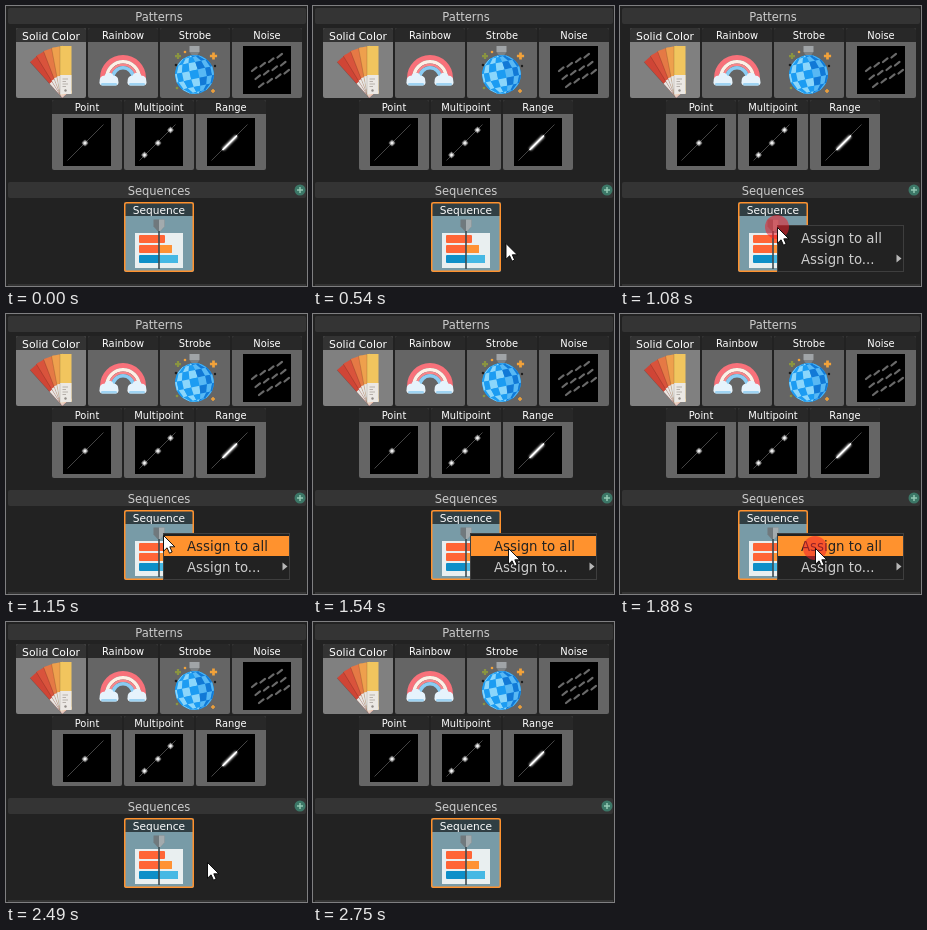
These frames come from a looping animation (301x280 px, 3750 ms). An HTML page:

```html
<!DOCTYPE html>
<html lang="en">
<head>
<meta charset="utf-8">
<title>Pattern and sequence panel</title>
<style>
  html, body { margin: 0; width: 100%; height: 100%; overflow: hidden; background: #222; }
  svg { display: block; width: 301px; height: 280px; }
  text { font-family: "DejaVu Sans", Verdana, sans-serif; fill: #fff; }
  .mid { text-anchor: middle; }
  .head { font-size: 11.5px; fill: #ccc; }
  .item { font-size: 13.3px; fill: #ccc; }
</style>
</head>
<body>
<svg id="stage" viewBox="0 0 301 280">
  <defs>
    <radialGradient id="glow">
      <stop offset="0" stop-color="#fff"/>
      <stop offset=".35" stop-color="#fff" stop-opacity=".8"/>
      <stop offset="1" stop-color="#fff" stop-opacity="0"/>
    </radialGradient>
    <filter id="soft" x="-50%" y="-50%" width="200%" height="200%"><feGaussianBlur stdDeviation="1"/></filter>
  </defs>
  <rect width="301" height="280" fill="#222"/>
  <g id="panel"></g>

  <g transform="translate(118 196)">
    <rect id="tile" width="70" height="70" rx="2" fill="#789ba7"/>
    <path id="tileHead" d="M0 14V2Q0 0 2 0H68Q70 0 70 2V14Z" fill="#303e43"/>
    <text class="mid" x="35" y="12" font-size="10.6">Sequence</text>
    <rect x="11" y="31" width="48" height="35" fill="#e9eff0"/>
    <rect x="15" y="33" width="26" height="8" rx="1" fill="#ff6536"/>
    <rect x="15" y="43" width="33" height="8" rx="1" fill="#ff6536"/>
    <rect x="35" y="43" width="13" height="8" rx="1" fill="#ff9234"/>
    <rect x="15" y="53" width="39" height="8" rx="1" fill="#0e8fc8"/>
    <rect x="35" y="53" width="19" height="8" rx="1" fill="#46b8e4"/>
    <path d="M35 28V67" stroke="#3c4a50" stroke-width="1.6"/>
    <path d="M29.5 17.5H40.5V24.5L36.5 29H33.5L29.5 24.5Z" fill="#70797d"/>
    <path d="M35 17.5H40.5V24.5L36.5 29H35Z" fill="#a3abae"/>
    <rect x=".75" y=".75" width="68.5" height="68.5" rx="2" fill="none" stroke="#ff922e" stroke-width="1.5"/>
  </g>

  <g id="menu" visibility="hidden">
    <rect x="157.5" y="219.5" width="126" height="46" fill="#222" stroke="#3e3e3e"/>
    <rect id="pick" x="158" y="222" width="125" height="20" fill="#ff922e"/>
    <text id="pickText" class="item" x="181" y="237">Assign to all</text>
    <text class="item" x="181" y="258">Assign to...</text>
    <path d="M276.5 248.5L281.5 252.5L276.5 256.5Z" fill="#b8b8b8"/>
  </g>
  <circle id="press" r="12" fill="#f0202c" fill-opacity=".55" visibility="hidden"/>
  <path id="cursor" d="M.5 .5V16.2L4.1 12.8L6.5 18.2L9.1 17L6.8 11.8H11.8Z"
        fill="#fff" stroke="#000" stroke-width=".9" visibility="hidden"/>
</svg>
<script>
const $ = id => document.getElementById(id);
const range = n => [...Array(n).keys()];
const rect = (x, y, w, h, fill, more = "") =>
  `<rect x="${x}" y="${y}" width="${w}" height="${h}" fill="${fill}" ${more}/>`;
const line = (d, stroke, width = 1, more = "") =>
  `<path d="${d}" fill="none" stroke="${stroke}" stroke-width="${width}" ${more}/>`;
const dot = (x, y, r, fill) => `<circle cx="${x}" cy="${y}" r="${r}" fill="${fill}"/>`;

function header(y, label) {
  return rect(2, y, 298, 16, "#343434", 'rx="2"') +
    `<text class="head mid" x="153" y="${y + 13}">${label}</text>`;
}

function tile(x, y, label, art, lit = false) {
  return `<g transform="translate(${x} ${y})">` +
    rect(0, 0, 70, 70, lit ? "#808080" : "#656565", 'rx="2"') +
    `<path d="M0 14V2Q0 0 2 0H68Q70 0 70 2V14Z" fill="${lit ? "#333" : "#282828"}"/>` +
    `<text class="mid" x="35" y="${lit ? 12 : 11}" font-size="${lit ? 10.8 : 9.9}">${label}</text>` +
    art + "</g>";
}

function swatches() {
  const hues = ["#cf4536", "#d9533c", "#e57945", "#eea04d", "#f1c55e"];
  const cards = hues.map((hue, i) =>
    `<g transform="rotate(${i * 10.5 - 42} 50 65)">` +
    rect(44, 18, 11.5, 48, hue) + rect(44, 47, 11.5, 19, "#ebe8e4") +
    line("M44 18V66", "#0003", .7) + "</g>").join("");
  const print = range(4).map(i => line(`M46.5 ${51 + i * 2.5}H${52 - i % 2 * 2}`, "#a9a39d", .8)).join("");
  return cards + print + dot(49.5, 62.5, 1.2, "#8f8a86");
}

function cloud(x) {
  return [[-5, 52, 4.3], [0, 49.5, 4.8], [5, 52, 4.2]].map(([dx, y, r]) => dot(x + dx, y, r, "#e6f3fc")).join("") +
    rect(x - 9.5, 51, 19, 6.5, "#e6f3fc", 'rx="3.2"') + rect(x - 8, 55, 16, 2.5, "#9fd3f2", 'rx="1.2"');
}

function rainbow() {
  const bands = [[20.5, 5, "#f8717a"], [16.2, 3.6, "#fdf0e6"], [13.2, 2.6, "#f8868a"], [10.2, 3.6, "#8accf3"]];
  return bands.map(([r, width, hue]) =>
    line(`M${35 - r} 54V50A${r} ${r} 0 0 1 ${35 + r} 50V54`, hue, width)).join("") + cloud(21) + cloud(49);
}

function plus(x, y, r, hue, width = r * .75) {
  return line(`M${x - r} ${y}H${x + r}M${x} ${y - r}V${y + r}`, hue, width);
}

// Square facets laid out on a sphere, tilted a little.
function discoBall() {
  const n = 7, r = 19.5;
  const angle = i => (i / n - .5) * Math.PI;
  const point = (col, row) =>
    `${r * Math.sin(angle(col)) * Math.cos(angle(row))} ${r * Math.sin(angle(row))}`;
  let facets = "";
  for (const row of range(n)) for (const col of range(n)) {
    const fill = (row + col) % 2 ? (col < 4 ? "#8bd6fb" : "#58b8f4") : (col < 4 ? "#1c9cf2" : "#1279d6");
    facets += `<path d="M${point(col, row)}L${point(col + 1, row)}L${point(col + 1, row + 1)}L${point(col, row + 1)}Z" fill="${fill}"/>`;
  }
  return rect(29.5, 18, 10, 6, "#a0a4a7") + '<path d="M29.5 24H39.5L36 29H33Z" fill="#7d8285"/>' +
    `<g transform="translate(34.5 46.5) rotate(-12)">${dot(0, 0, r, "#1c9cf2")}${facets}</g>` +
    plus(18, 28, 3, "#8a9440") + plus(53.5, 28, 3.6, "#f2a23a") +
    plus(53, 63, 2, "#f2a23a") + dot(16, 37, 1.3, "#1d1d1d") +
    dot(25, 24, 1.3, "#f2a23a") + dot(55, 38, 1.2, "#1d1d1d") + dot(17, 60, 1.3, "#8a9440");
}

const black = rect(11, 18, 48, 48, "#000");
const diagonal = line("M15.5 60.5L51.5 24.5", "#444");
const star = (x, y) =>
  `<circle cx="${x}" cy="${y}" r="3.3" fill="url(#glow)"/>` + plus(x, y, 3.3, "#fff8", .6);

function noise() {
  let dashes = "";
  for (const row of range(3)) for (const col of range(4)) {
    const x = 20 + col * 8.5 + row * 3.5, y = 43 - col * 4.5 + row * 8;
    dashes += line(`M${x} ${y}l4.5 -3.6`, "#6a6a6a", 2.2, 'stroke-linecap="round"');
  }
  return black + dashes;
}

const beam = "M27 49.5L40.5 36";
$("panel").innerHTML =
  header(2, "Patterns") +
  tile(10, 22, "Solid Color", swatches(), true) +
  tile(82, 22, "Rainbow", rainbow()) +
  tile(154, 22, "Strobe", discoBall()) +
  tile(226, 22, "Noise", noise()) +
  tile(46, 94, "Point", black + diagonal + star(33, 43)) +
  tile(118, 94, "Multipoint", black + diagonal + star(20.5, 55) + star(34, 43) + star(46.5, 30)) +
  tile(190, 94, "Range", black + diagonal + line(beam, "#fff", 2.6, 'filter="url(#soft)"') +
    line(beam, "#fff", 1.7, 'stroke-linecap="round"')) +
  header(176, "Sequences") +
  dot(294, 184, 5.5, "#3c7767") + plus(294, 184, 3, "#93c9b4", 1.5) +
  rect(2, 278, 298, 2, "#343434");

// Cursor tip: [ms, x, y]; no position means it is off stage.
const path = [
  [0], [330, 249, 270], [400, 231, 259], [470, 211, 247], [540, 192.5, 237],
  [610, 181, 231], [680, 171, 226], [750, 162, 223], [810, 157, 221],
  [1410, 169, 225], [1480, 184, 230], [1540, 195, 234], [1950, 195.5, 234.5],
  [2490, 201, 240], [2560, 213, 249], [2620, 232, 260], [2690, 252, 270], [2750]
];
const LOOP = 3750;
const within = (t, from, to) => t >= from && t < to;
const show = (id, on) => $(id).setAttribute("visibility", on ? "visible" : "hidden");

function draw(t) {
  const [, x, y] = path.findLast(step => step[0] <= t);
  const seen = x !== undefined;
  show("cursor", seen);
  if (seen) {
    $("cursor").setAttribute("transform", `translate(${x} ${y})`);
    $("press").setAttribute("cx", x);
    $("press").setAttribute("cy", y);
  }
  const picked = within(t, 1150, 1950);
  const hover = within(t, 610, 1080);
  show("menu", within(t, 1080, 1950));
  show("pick", picked);
  show("press", within(t, 1080, 1150) || within(t, 1880, 1950));
  $("pickText").style.fill = picked ? "#222" : "#ccc";
  $("tile").setAttribute("fill", hover ? "#90adb8" : "#789ba7");
  $("tileHead").setAttribute("fill", hover ? "#3a454a" : "#303e43");
}

const start = performance.now();
function tick() {
  draw((performance.now() - start) % LOOP);
  requestAnimationFrame(tick);
}
tick();
</script>
</body>
</html>
```
